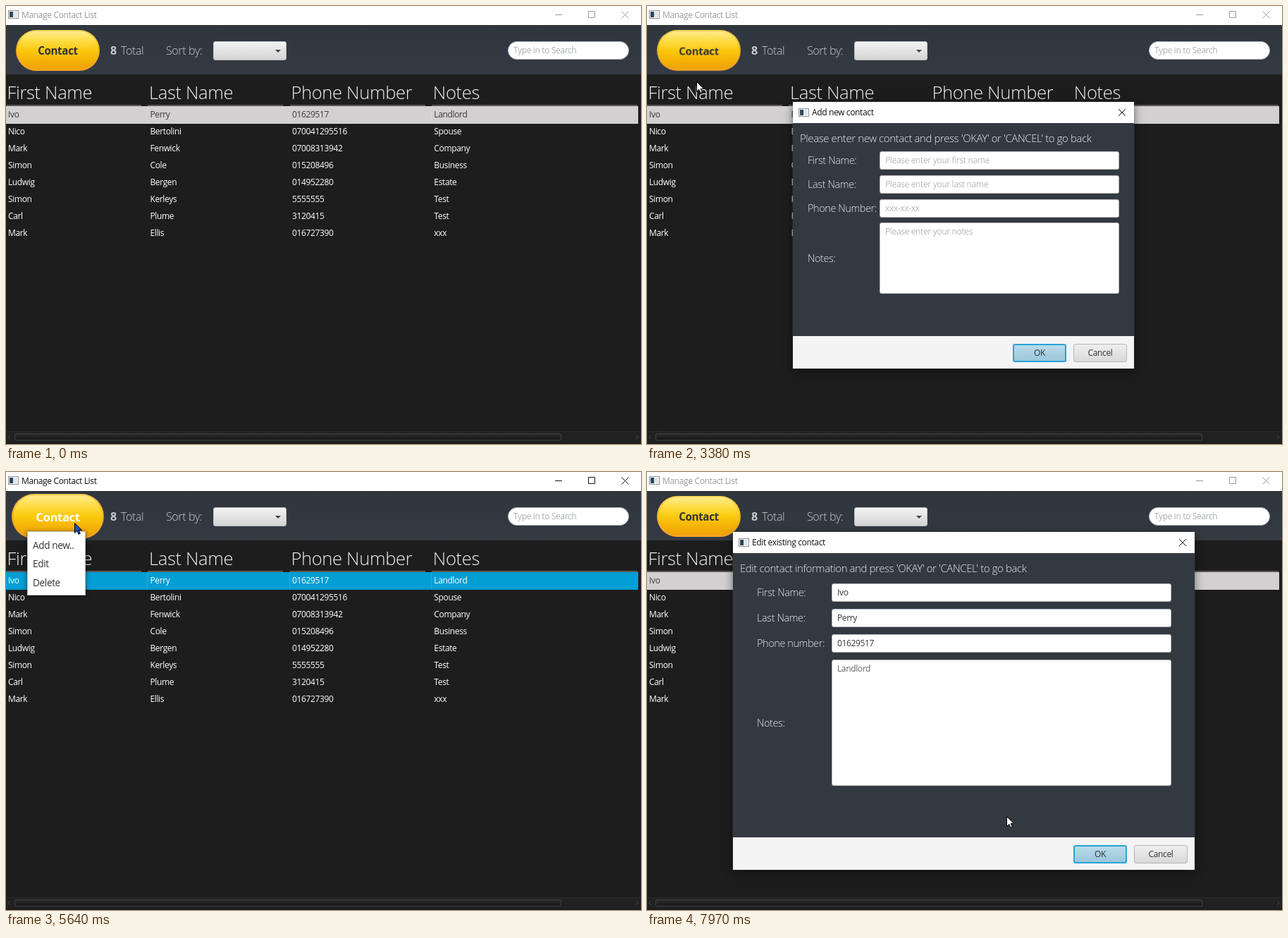
Animation, 901 px wide and 621 px high, one loop 8000 ms. Source, as an HTML page:

```html
<!DOCTYPE html>
<html lang="en">
<head>
<meta charset="utf-8">
<title>Manage Contact List</title>
<style>
html, body { margin: 0; width: 100%; height: 100%; overflow: hidden; background: #1d1d1d; }
body { position: relative; font: 12px/20px "Open Sans", "Noto Sans", sans-serif; letter-spacing: -.03em; color: #fff; }
body * { position: absolute; box-sizing: border-box; white-space: pre; }
body svg { overflow: visible; fill: none; stroke: currentColor; }
b { font-weight: 700; }

/* every state change is a hard cut on the same eight second clock */
.bar, .contact, .contact span, .sel, .menu, .dialog, .add .close, .cursor, .cursor path {
  animation: 8s step-end infinite;
}

.bar { left: 0; top: 0; width: 100%; height: 27px; background: #fff; animation-name: active; }
.icon { width: 15px; height: 12px; border: 1px solid #8a8f94; background: linear-gradient(90deg, #2f4858 50%, #dfe6ea 50%); box-shadow: inset 0 0 0 1px #fff; }
.tools { left: 0; top: 27px; width: 100%; height: 70px; background: linear-gradient(#30363e, #343a43); border-top: 1px solid #272c32; }
.light { font-weight: 300; font-size: 16px; color: #c9ccd0; }

.contact { left: 14px; top: 34px; width: 119px; height: 58px; border-radius: 29px; border: 2px solid transparent;
  background: linear-gradient(#ffec8c, #fddc45 25%, #fac90d 50%, #f3ab06 85%, #f0a30c) padding-box,
    linear-gradient(#f9d558, #f3b01c 50%, #f5a52c) border-box; animation-name: grow; }
.contact span { left: 0; width: 100%; top: 16.5px; text-align: center; font-weight: 700; font-size: 15.2px; color: #333; animation-name: label; }

.combo { left: 294px; top: 50px; width: 104px; height: 27px; border-radius: 3px; border: 1px solid #bdbdbd; background: linear-gradient(#f3f3f3, #d4d4d4); }
.combo i { right: 7px; top: 11px; border: 4px solid transparent; border-top-color: #444; }
.search { left: 712px; top: 50px; width: 172px; height: 26px; border-radius: 13px; border: 1px solid #b4b7ba; background: #fff; color: #a9b0aa; padding: 2px 7px; }

.head { top: 108px; line-height: 30px; font-size: 25.6px; font-weight: 300; color: #f0f0f0; }
.rule { top: 140px; height: 2px; background: #5c5757; }
.row { left: 0; width: 897px; height: 24.5px; }
.row span { top: 1.5px; }
.row i { top: 0; width: 1px; height: 100%; background: #fff2; }
.sel { background: #d3d0d1; color: #3a3a3a; animation-name: row; }
.scroll { left: 0; top: 603px; width: 100%; height: 15px; background: #212121; border-top: 1px solid #2a2a2a; }
.scroll i { left: 12px; top: 2px; width: 776px; height: 10px; border: 1px solid #414141; border-radius: 2px; background: linear-gradient(#2a2a2a, #181818); }

.menu { left: 30px; top: 84px; width: 83px; height: 91px; background: #fff; border: 1px solid #c2c2c2; box-shadow: 0 1px 6px #0009; color: #333; font-size: 13.6px; opacity: 0; animation-name: menu; }
.menu span { left: 7px; }

.dialog { background: #333941; box-shadow: 0 0 1px #777, 0 3px 12px #0008; opacity: 0; }
.add { animation-name: add; }
.edit { animation-name: edit; }
.cap { left: 0; top: 0; width: 100%; height: 30px; background: #fff; color: #111; }
.cap .icon { left: 8px; top: 9px; }
.cap span { left: 27px; top: 5px; }
.close { right: 0; top: 0; width: 33px; height: 29px; }
.add .close { animation-name: hover; }
.foot { left: 0; bottom: 0; width: 100%; height: 46px; background: #f4f4f4; }
.foot span { top: 11px; width: 76px; height: 26px; line-height: 24px; text-align: center; border-radius: 3px; color: #333; border: 1px solid #b5b5b5; background: linear-gradient(#efefef, #d9d9d9); }
.foot .ok { right: 96px; line-height: 22px; border: 2px solid #2ba3d6; background: linear-gradient(#b7dceb, #9cc6db); }
.foot .no { right: 10px; }
.dialog .light { color: #eceef0; }
.field { border-radius: 3px; border: 1px solid #b9bcbf; background: #fff; padding: 2px 7px; color: #333; }
.add .field { color: #b3bab3; }
.edit .tall { color: #666; }

.cursor { left: 0; top: 0; opacity: 0; animation-name: move; }
.cursor path { fill: #fff; stroke: #000; animation-name: tint; }

@keyframes active {
  0%, 38.25%, 83.25%, 100% { color: #9a9a96; }
  16.875%, 59% { color: #111; }
}
@keyframes label {
  0%, 39.375%, 84.125%, 100% { color: #333; }
  16.875%, 69.375% { color: #fff; }
}
@keyframes row {
  0%, 39.375%, 84.125%, 100% { background: #d3d0d1; color: #3a3a3a; }
  18.75%, 59% { background: #039ed4; color: #fff; }
}
@keyframes grow {
  0%, 30.5%, 75.25%, 100% { transform: none; }
  11.25%, 29.5625%, 67.5%, 74.375% { transform: scale(1.05); }
  12.25%, 68.5% { transform: scale(1.1); }
}
@keyframes menu {
  0%, 35.5%, 81.125%, 100% { opacity: 0; }
  18.75%, 69.375%, 80.25% { opacity: .5; }
  19.75%, 70.5% { opacity: 1; }
}
/* dialogs rise slightly while they are scaled */
@keyframes add {
  0%, 61%, 100% { opacity: 0; transform: translateY(-2px) scale(.96); }
  39.375% { opacity: .35; transform: translateY(-1.5px) scale(.967); }
  40.375% { opacity: .75; transform: translateY(-1.5px) scale(.985); }
  41.25% { opacity: .93; transform: scale(.996); }
  42.25% { opacity: 1; transform: none; }
  59% { opacity: .7; transform: translateY(-1.5px) scale(.985); }
  60% { opacity: .21; transform: translateY(-1.5px) scale(.965); }
}
@keyframes edit {
  0% { opacity: 0; transform: translateY(-2px) scale(.96); }
  84.125% { opacity: .68; transform: translateY(-1.5px) scale(.983); }
  85.125% { opacity: .92; transform: scale(.996); }
  86.125%, 100% { opacity: 1; transform: none; }
}
@keyframes hover {
  0%, 59%, 100% { background: #fff; color: #111; }
  57.125% { background: #e81123; color: #fff; }
}
@keyframes tint {
  0%, 28.625%, 61%, 73.375%, 100% { fill: #fff; }
  18.75%, 69.375% { fill: #1a4fc4; }
  60% { fill: #d9662a; }
}
@keyframes move {
  0% { opacity: 0; transform: translate(765px, 597px); }
  2.375% { opacity: 1; transform: translate(765px, 597px); animation-timing-function: steps(5); }
  7.3125% { transform: translate(250px, 210px); animation-timing-function: steps(5); }
  12.25% { transform: translate(80px, 58px); }
  13% { transform: translate(76px, 66px); }
  14.125% { transform: translate(72px, 74px); }
  28.625% { transform: translate(66px, 82px); }
  29.5625% { transform: translate(61px, 90px); }
  30.5% { transform: translate(58px, 95px); }
  32.625% { transform: translate(70px, 101px); }
  35.5% { transform: translate(70px, 107px); }
  44.125% { transform: translate(69px, 107px); }
  46.25% { transform: translate(100px, 96px); animation-timing-function: steps(4); }
  50.2% { transform: translate(330px, 174px); animation-timing-function: steps(6); }
  56.125% { transform: translate(668px, 131px); }
  57.125% { transform: translate(673px, 147px); }
  60% { transform: translate(551px, 139px); animation-timing-function: steps(9); }
  68.5% { transform: translate(97px, 72px); }
  73.375% { transform: translate(90px, 88px); animation-timing-function: steps(3); }
  76.25% { transform: translate(66px, 134px); }
  78.125% { transform: translate(66px, 135px); }
  80.25% { transform: translate(66px, 137px); }
  92.875% { transform: translate(100px, 170px); animation-timing-function: steps(7); }
  99.625%, 100% { opacity: 1; transform: translate(510px, 488px); }
}
</style>
</head>
<body>
<div class="bar">
  <i class="icon" style="left:3px;top:6px"></i>
  <span style="left:22px;top:3px">Manage Contact List</span>
  <svg style="left:0;top:0" width="901" height="27"><path d="M779 12.5h10M826.5 7.5h9v9h-9zM873.5 7.5l10 10m0-10l-10 10"/></svg>
</div>
<div class="tools"></div>
<div class="contact"><span>Contact</span></div>
<div class="light" style="left:148px;top:53px"><b style="position:static">8</b></div>
<div class="light" style="left:163px;top:53px">Total</div>
<div class="light" style="left:227px;top:53px">Sort by:</div>
<div class="combo"><i></i></div>
<div class="search">Type in to Search</div>
<div id="table"></div>
<div class="scroll"><i></i>
  <svg style="left:0;top:0" width="901" height="15" color="#444"><path d="M6 4l-3 3 3 3M894 4l3 3-3 3"/></svg>
</div>
<div class="menu"></div>
<div id="dialogs"></div>
<svg class="cursor" width="12" height="18"><path d="M.5.5v14l3.3-3.2 2.2 5 2.3-1-2.2-4.9h4.6z"/></svg>

<script>
const $ = s => document.querySelector(s);
const PITCH = 201.45;
const people = [
  ["Ivo", "Perry", "01629517", "Landlord"],
  ["Nico", "Bertolini", "070041295516", "Spouse"],
  ["Mark", "Fenwick", "07008313942", "Company"],
  ["Simon", "Cole", "015208496", "Business"],
  ["Ludwig", "Bergen", "014952280", "Estate"],
  ["Simon", "Kerleys", "5555555", "Test"],
  ["Carl", "Plume", "3120415", "Test"],
  ["Mark", "Ellis", "016727390", "xxx"]
];

const heads = ["First Name", "Last Name", "Phone Number", "Notes"].map((name, c) => {
  const x = c * PITCH;
  return `<span class="head" style="left:${x + 1.5}px">${name}</span>
    <i class="rule" style="left:${x}px;width:${c < 3 ? 192 : 292}px"></i>`;
});
const rows = people.map((person, r) => {
  const cells = person.map((text, c) =>
    `<span style="left:${c * PITCH + 3}px">${text}</span>` +
    (c && !r ? `<i style="left:${Math.round(c * PITCH) - 1}px"></i>` : ""));
  return `<div class="row ${r ? "" : "sel"}" style="top:${142 + r * 24.14}px">${cells.join("")}</div>`;
});
$("#table").innerHTML = heads.concat(rows).join("");

$(".menu").innerHTML = ["Add new..", "Edit", "Delete"]
  .map((text, i) => `<span style="top:${8.5 + i * 26.5}px">${text}</span>`).join("");

// Field places are relative to the dialog: [label, text, top, height]
function dialog({ kind, box: [x, y, w, h], title, lead, labelX, fieldX, fieldW, fields }) {
  const form = fields.map(([label, text, top, height]) =>
    `<span class="light" style="left:${labelX}px;top:${top + height / 2 - 10}px;font-size:14.4px">${label}</span>
     <div class="field ${height > 30 ? "tall" : ""}" style="left:${fieldX}px;top:${top}px;width:${fieldW}px;height:${height}px">${text}</div>`);
  return `<div class="dialog ${kind}" style="left:${x}px;top:${y}px;width:${w}px;height:${h}px">
    <div class="cap"><i class="icon"></i><span>${title}</span>
      <div class="close"><svg style="left:11px;top:10px" width="10" height="10"><path d="M0 0l10 10m0-10l-10 10"/></svg></div></div>
    <span class="light" style="left:10px;top:40.5px;font-size:14.9px">${lead} and press 'OKAY' or 'CANCEL' to go back</span>
    ${form.join("")}
    <div class="foot"><span class="ok">OK</span><span class="no">Cancel</span></div>
  </div>`;
}

const [first, last, phone, notes] = people[0];
$("#dialogs").innerHTML = dialog({
  kind: "add", box: [207, 136, 484, 378], title: "Add new contact", lead: "Please enter new contact",
  labelX: 21, fieldX: 123, fieldW: 340,
  fields: [
    ["First Name:", "Please enter your first name", 70, 26],
    ["Last Name:", "Please enter your last name", 104, 26],
    ["Phone Number:", "xxx-xx-xx", 138, 26],
    ["Notes:", "Please enter your notes", 171, 101]
  ]
}) + dialog({
  kind: "edit", box: [122, 85, 655, 479], title: "Edit existing contact", lead: "Edit contact information",
  labelX: 34, fieldX: 140, fieldW: 482,
  fields: [
    ["First Name:", first, 73, 26],
    ["Last Name:", last, 109, 26],
    ["Phone number:", phone, 145, 26],
    ["Notes:", notes, 181, 179]
  ]
});
</script>
</body>
</html>
```
